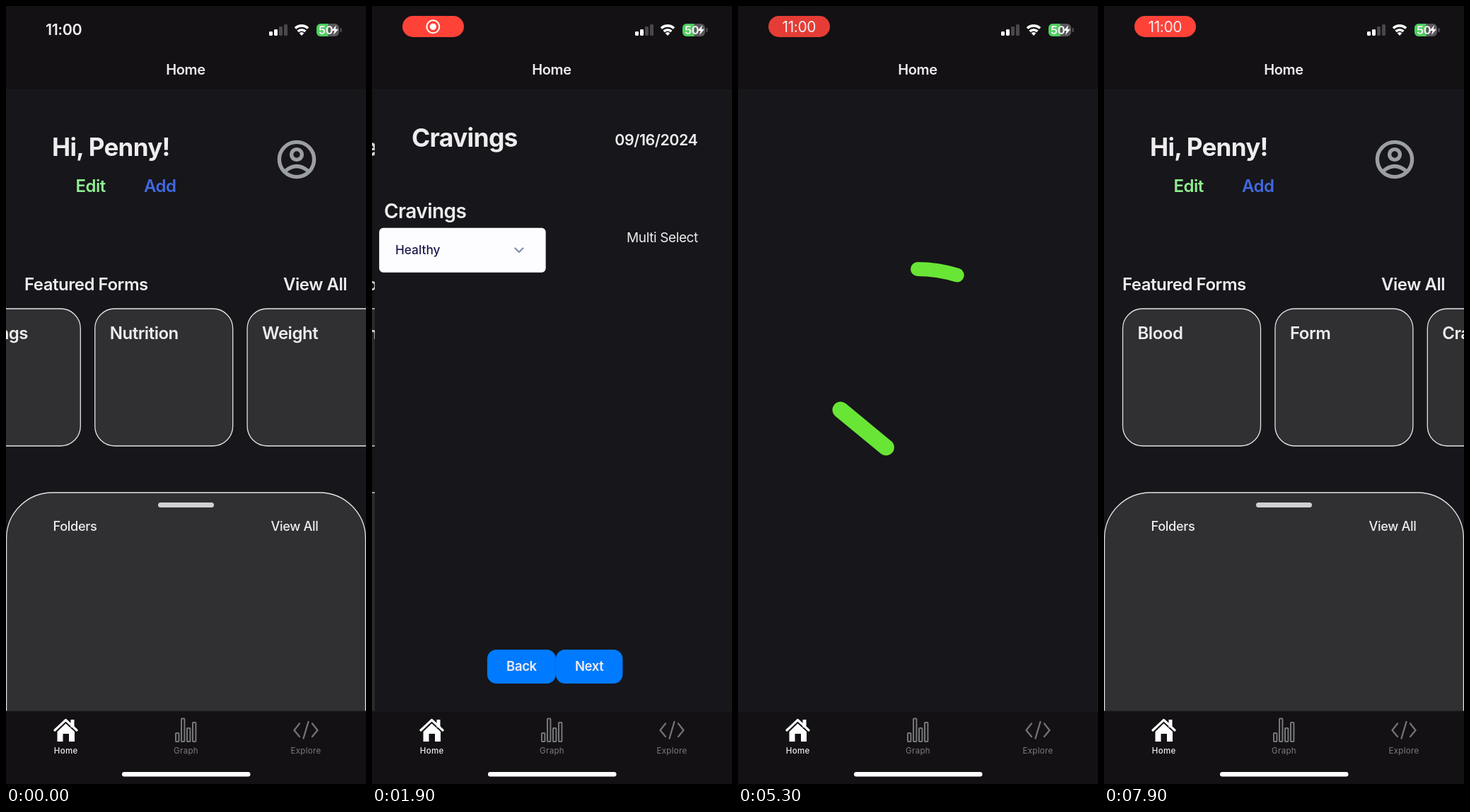
An HTML page for the animation above (8000 ms loop, 509x1100 px).

```html
<!DOCTYPE html>
<html lang="en">
<head>
<meta charset="utf-8">
<title>Health forms app</title>
<style>
  html, body { margin: 0; width: 100%; height: 100%; overflow: hidden; background: #131114; }
  svg { display: block; width: 100%; height: 100%; }
  text { font-family: Inter, "Open Sans", sans-serif; fill: #eeecef; letter-spacing: -.02em; white-space: pre; }
  .b { font-weight: 700; }
  .s { font-weight: 600; }
  .m { font-weight: 500; }
  .ink { fill: #1d1b4b; letter-spacing: 0; }
  .tab { letter-spacing: .03em; }
  .line { fill: none; stroke-linecap: round; stroke-linejoin: round; }
  .panel { fill: #302f31; stroke: #e4e2e5; stroke-width: 1.3; }
</style>
</head>
<body>
<svg id="stage" viewBox="0 0 509 1100"></svg>
<script>
const LOOP = 8000, STEP = 100, WIDTH = 509, PARALLAX = 152;
const CARDS = ['Blood', 'Form', 'Cravings', 'Nutrition', 'Weight'];
const OPTIONS = ['Healthy', 'Junk food', 'Sweet', 'Salty'];
const AT = {
  scroll: 0, pill: 400, press: 1300, push: 1520, open: 2800, pillTime: 2900,
  pick: 3400, close: 3600, next: 4600, loading: 4800, draw: 5070, done: 6720
};

const text = (x, y, size, cls, str, extra = '') =>
  `<text x="${x}" y="${y}" font-size="${size}" class="${cls}" ${extra}>${str}</text>`;
const rect = (x, y, w, h, r, fill, extra = '') =>
  `<rect x="${x}" y="${y}" width="${w}" height="${h}" rx="${r}" fill="${fill}" ${extra}/>`;
const line = (d, color, width, extra = '') =>
  `<path class="line" d="${d}" stroke="${color}" stroke-width="${width}" ${extra}/>`;
const END = 'text-anchor="end"', MID = 'text-anchor="middle"';
const pageBase = rect(0, 119, WIDTH, 878, 0, '#17161a');
const shade = id => rect(0, 119, WIDTH, 878, 0, '#000', `id="${id}" opacity="0"`);

const card = (name, i) => `<g id="card${i}" transform="translate(${26.5 + i * 215.4} 428)">
  <rect class="panel" width="195" height="194" rx="28"/>${text(21, 43, 24, 's', name)}</g>`;

const home = `<g id="home">${pageBase}
  ${text(65, 212, 35, 'b', 'Hi, Penny!')}
  ${text(98.5, 263, 24, 's', 'Edit', 'style="fill:#90ee90"')}
  ${text(195, 263, 24, 's', 'Add', 'style="fill:#4169e1"')}
  <g class="line" stroke="#9b9ea3" stroke-width="5.4">
    <circle cx="411" cy="217" r="24.6"/><circle cx="411" cy="210" r="7.4"/>
    <path d="M394 234Q411 219 428 234" stroke-linecap="butt"/>
  </g>
  ${text(26, 402, 24, 's', 'Featured Forms')}
  ${text(482, 402, 24, 's', 'View All', END)}
  <g id="cards">${CARDS.map(card).join('')}</g>
  <path class="panel" d="M.6 1010V753A65 65 0 0 1 65.6 688H443.4A65 65 0 0 1 508.4 753V1010Z"/>
  ${rect(215, 702, 79, 7, 3.5, '#d3d0d3')}
  ${text(66.5, 742, 18.2, 'm', 'Folders')}
  ${text(441.5, 742, 18.2, 'm', 'View All', END)}
  ${shade('homeShade')}</g>`;

const button = (x, w, label, id) => `<g id="${id}">${rect(x, 910, w, 48, 13, '#007aff')}
  ${text(x + w / 2, 940, 18.5, 's', label, MID)}</g>`;
const option = (name, i) =>
  rect(7, 377 + i * 52, 236.5, 52, 0, i ? '#fdfdff' : '#ebebf6', `id="row${i}"`) +
  text(29, 410 + i * 51.7, 17.3, 'm ink', name);

const form = `<g id="form">${pageBase}
  <g id="fields">
    ${text(52, 199, 35.5, 'b', 'Cravings')}
    ${text(456.5, 197, 21.4, 's', '09/16/2024', END)}
    ${text(13, 300, 28, 's', 'Cravings')}
    ${text(457, 334, 19, '', 'Multi Select', END)}
    ${rect(7, 314.5, 234, 61.5, 5, '#fdfdff', 'id="select" stroke-width="1.5"')}
    ${text(29, 351, 17.3, 'm ink', 'Healthy', 'id="value"')}
    ${line('M198.500 342.500L204 348L209.500 342.500', '#8790b0', 2.4, 'id="chevron"')}
    <g id="menu">${rect(6.5, 376, 237.5, 209.5, 5, '#fdfdff')}
      <g clip-path="url(#menuClip)">${OPTIONS.map(option).join('')}</g></g>
    ${button(159, 97, 'Back', 'back')}${button(256, 94.5, 'Next', 'next')}
  </g>
  <g id="success">
    ${line('M254 372A185 185 0 0 1 254 742A185 185 0 0 1 254 372', '#69e536', 20, 'id="ring" pathLength="1"')}
    ${line('M145 571L230 641L363 475', '#69e536', 23, 'id="tick" pathLength="1"')}
  </g>
  ${shade('formShade')}</g>`;

const statusBar = `
  ${text(56, 41, 21.5, 's', '11:00', 'id="clock"')}
  <g id="pill">${rect(43, 14, 87, 30, 15, '#ff4238', 'id="pillBody"')}
    <g id="record"><circle cx="86.300" cy="29.300" r="9" fill="none" stroke="#fff" stroke-width="2"/>
      <circle cx="86.300" cy="29.300" r="4.600" fill="#fff"/></g>
    ${text(86.3, 36.5, 21, '', '11:00', MID + ' id="pillClock"')}</g>
  ${[6, 9, 13, 16].map((h, i) => rect(372 + i * 7, 42 - h, 5, h, 1.4, i < 2 ? '#fff' : '#49474a')).join('')}
  <g fill="none" stroke="#fff" stroke-width="3.600">
    <path d="M409 31.500A13 13 0 0 1 427 31.500M412.600 35.800A8 8 0 0 1 423.400 35.800"/></g>
  <path d="M418 42L414.700 38.500A5 5 0 0 1 421.300 38.500Z" fill="#fff"/>
  ${rect(439, 25, 32, 18, 6, '#59575a')}
  <path d="M455.500 25V43H445A6 6 0 0 1 439 37V31A6 6 0 0 1 445 25Z" fill="#4bcf5c"/>
  ${rect(472.5, 31, 2, 6, 1, '#59575a')}
  ${text(442, 39.7, 16, 'b', '50')}
  <path d="M467 27L460.500 35H464.500L463 41L470 32.800H465.800Z" fill="#fff"/>`;

const bar = (x, top) => `<rect x="${x}" y="${top}" width="4.400" height="${1040 - top}" rx=".8"/>`;
const tabs = `
  ${rect(0, 997, WIDTH, 103, 0, '#131114')}${rect(0, 996.5, WIDTH, 1, 0, '#1e1c20')}
  ${rect(91.5, 1009, 5, 11, .5, '#fff')}
  ${line('M69 1024L84.500 1009.500L100 1024', '#fff', 3.2)}
  <path d="M72.500 1026L84.500 1014.500L97 1026V1040H89V1029H80.500V1040H72.500Z" fill="#fff"/>
  <g fill="none" stroke="#77767a" stroke-width="2">${bar(240, 1028)}${bar(248, 1007.5)}${bar(256, 1021)}${bar(264, 1013)}</g>
  ${line('M415 1014.500L407.500 1024L415 1033M427.500 1012L420.500 1035.500M433 1014.500L440.500 1024L433 1033', '#727175', 2.3)}
  ${text(84.7, 1057, 11.5, 'm tab', 'Home', MID)}
  ${text(254.5, 1057, 11.5, 'tab', 'Graph', MID + ' style="fill:#7c7b7f"')}
  ${text(424, 1057, 11.5, 'tab', 'Explore', MID + ' style="fill:#7c7b7f"')}
  ${rect(164, 1083, 181.5, 6.5, 3.2, '#fff')}`;

const stage = document.getElementById('stage');
stage.innerHTML = `
  <clipPath id="menuClip"><rect x="6.500" y="376" width="237.500" height="209.500" rx="5"/></clipPath>
  <g id="pages">${home}${form}</g>
  ${rect(0, 0, WIDTH, 119, 0, '#131114')}${rect(0, 118.5, WIDTH, 1, 0, '#1e1c20')}
  ${text(254, 97, 20, 's', 'Home', MID)}${statusBar}${tabs}`;

const $ = id => document.getElementById(id);
const set = (id, name, value) => $(id).setAttribute(name, value);
const show = (id, on) => set(id, 'visibility', on ? 'inherit' : 'hidden');
const clamp = v => Math.min(1, Math.max(0, v));

// Share of the way still to go in a critically damped slide.
const remaining = ms => {
  const k = Math.max(0, ms) * .01826;
  return (1 + k) * Math.exp(-k);
};
const inOut = (p, n) => p < .5 ? (2 * p) ** n / 2 : 1 - (2 - 2 * p) ** n / 2;

function slide(top, under, rest) {
  if ($('pages').lastElementChild !== $(top)) $('pages').append($(top));
  set(top, 'transform', `translate(${WIDTH * rest} 0)`);
  set(under, 'transform', `translate(${-PARALLAX * (1 - rest)} 0)`);
  set(top + 'Shade', 'opacity', 0);
  set(under + 'Shade', 'opacity', .1 * (1 - rest));
}

function trim(id, p) {
  show(id, p > 0);
  set(id, 'stroke-dasharray', `${p} 2`);
}

function render(t) {
  const finished = t >= AT.loading;
  if (finished) slide('home', 'form', remaining(t - AT.done));
  else slide('form', 'home', remaining(t - AT.push));

  const scroll = finished ? 0 : 392.3 + 154.7 * Math.exp(-(t - AT.scroll) / 270);
  set('cards', 'transform', `translate(${-scroll} 0)`);
  const pressed = clamp((t - AT.press) / 150) - clamp((t - AT.push) / 200);
  set('card2', 'opacity', 1 - .8 * pressed);

  const open = t >= AT.open && t < AT.close;
  show('menu', open);
  set('select', 'stroke', open ? '#3b72dc' : '#fdfdff');
  set('chevron', 'transform', open ? 'rotate(180 204 345)' : '');
  set('row1', 'fill', t >= AT.pick ? '#dfe0e2' : '#fdfdff');
  $('value').textContent = OPTIONS[t >= AT.close ? 1 : 0];
  set('next', 'opacity', t >= AT.next ? .3 : 1);
  show('fields', !finished);

  trim('ring', inOut(clamp((t - AT.draw) / 1000), 3));
  trim('tick', inOut(clamp((t - AT.draw) / 640), 2));

  show('clock', t < AT.pill);
  show('pill', t >= AT.pill);
  show('record', t < AT.pillTime);
  show('pillClock', t >= AT.pillTime);
  const glow = .5 + .5 * Math.cos((t - 1900) / 1000 * Math.PI);
  set('pillBody', 'fill', `rgb(${216 + 39 * glow},${58 + 8 * glow},${51 + 5 * glow})`);
}

const start = performance.now();
function tick() {
  const t = (performance.now() - start) % LOOP;
  render(Math.floor(t / STEP) * STEP);
  requestAnimationFrame(tick);
}
tick();
</script>
</body>
</html>
```
